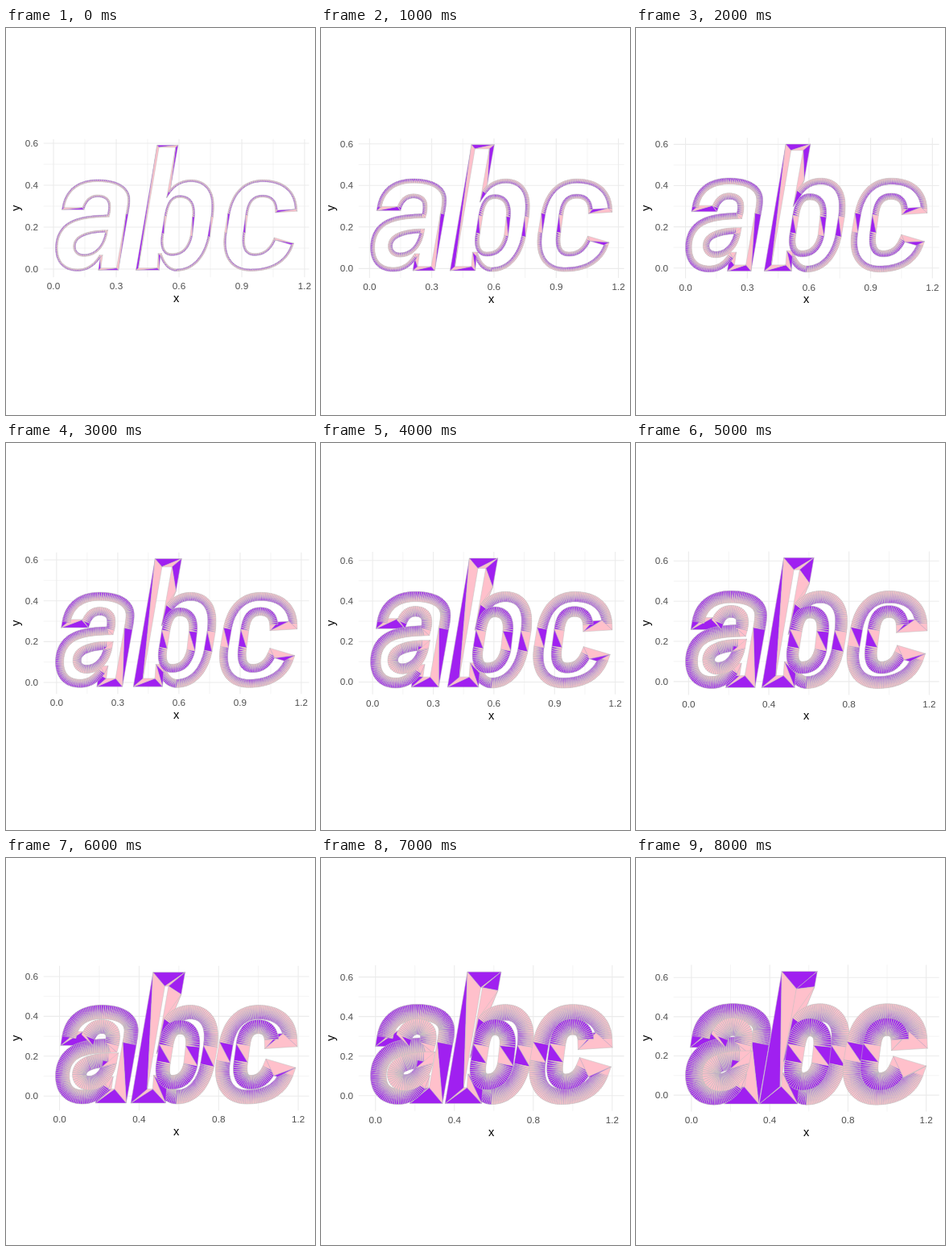
An HTML page with a canvas for the animation above (9 s loop, 384 px wide and 480 px high).

```html
<!DOCTYPE html>
<html lang="en">
<head>
<meta charset="utf-8">
<title>Stroked letters</title>
<style>
  html, body { margin: 0; width: 100%; height: 100%; overflow: hidden; background: #fff; }
  canvas { display: block; width: 384px; height: 480px; }
</style>
</head>
<body>
<canvas id="plot" width="384" height="480"></canvas>
<script>
const STEPS = 9, STEP_MS = 1000;
const PURPLE = '#a020f0', PINK = '#ffc0cb', EDGE = '#bebebe', GRID = '#ebebeb';
const FONT = '"Liberation Sans", Arial, sans-serif';
const UNIT = 260;                       // pixels per axis unit at the first step
const ORIGIN = { x: 59, y: 299 };
const CENTER = { x: 211.7, y: 223.4 };
const LEFT = 46.7, RIGHT = 376.7;
const ctx = document.getElementById('plot').getContext('2d');

// Letter outlines; F swaps the two fill colours from there on.
const CONTOURS = [
  `M96 224 L71 224 C74 202 89 189.3 114 189.3 C138 189.3 152.7 198 152.7 213
   C152.7 219 151.5 225 150.5 230.5 L138.5 299 L116.3 299 L118.6 283 L116.8 283
   C110 294 101 300.2 89 300.2 C72 300.2 62.8 290 62.8 273
   C62.8 255 72 243 88 238 C100 234 114 233.5 127 233
   C128.5 228 129 223 128.5 219 C128 212 122 208.3 114 208.3
   C105 208.3 99 214 96 224`,
  `M125 252 C112 252 103 254 97 256.5 C89 259.5 85 264.5 85 271
   C85 278 90 282 97 282 C111 282 122 271 125 252`,
  `M212 300.2 C203 300.2 196.5 293 192.3 281 L190.5 281 L189.2 299 L163 299
   L189 146.6 L212.3 146.6 L202 205 F C208.4 195.5 217.5 189.5 230 189.5
   C247 189.5 257 201 257 220 C257 225 256.8 229 256.2 234
   L252 259 C247 283 233 300.2 212 300.2`,
  `M216 209 C206 209 201 217 198.3 233 L194.8 255 C192 270 195 281 206 281
   C220 281 227 272 230.3 258 L233 234 C234.5 217 228 209 216 209`,
  `M356 268 C349 289 331 300.2 304 300.2 C284 300.2 272 288 272 266
   C272 262 272.4 258 273 254 L277 230 C282 204 297 189.5 319 189.5
   C344 189.5 360 202 360.5 226 L336 227.5 C336 215 330 208.5 319 208.5
   C306 208.5 301 217 299 232 L296 254 C293.5 271 297 281 309 281
   C321 281 329 274 334 261.5`
];

let swapped = false;

// Turns an outline into a closed list of points, each with its swap flag.
function flatten(path) {
  const pts = [];
  let last;
  const add = (x, y) => { last = { x, y, swapped }; pts.push(last); };
  for (const [, cmd, args] of path.matchAll(/([MLCF])([^MLCF]*)/g)) {
    const n = args.trim().split(/\s+/).map(Number);
    if (cmd === 'F') {
      swapped = !swapped;
      last.swapped = swapped;
    } else if (cmd === 'C') {
      const { x, y } = last;
      const [ax, ay, bx, by, ex, ey] = n;
      const length = (Math.hypot(ex - x, ey - y) + Math.hypot(ax - x, ay - y) +
        Math.hypot(bx - ax, by - ay) + Math.hypot(ex - bx, ey - by)) / 2;
      const count = Math.max(3, Math.round(length / 1.9));
      for (let i = 1; i <= count; i++) {
        const t = i / count, u = 1 - t;
        const mix = (a, b, c, d) => u*u*u*a + 3*u*u*t*b + 3*u*t*t*c + t*t*t*d;
        add(mix(x, ax, bx, ex), mix(y, ay, by, ey));
      }
    } else add(n[0], n[1]);
  }
  const end = pts[pts.length - 1];
  if (Math.hypot(end.x - pts[0].x, end.y - pts[0].y) < 0.01) pts.pop();
  return pts;
}

function normal(a, b) {
  const len = Math.hypot(b.x - a.x, b.y - a.y);
  return { x: (b.y - a.y) / len, y: (a.x - b.x) / len };
}

// Adds to every point its unit miter vector.
function withMiters(pts) {
  const n = pts.length;
  return pts.map((p, i) => {
    const a = normal(pts[(i + n - 1) % n], p), b = normal(p, pts[(i + 1) % n]);
    const k = 1 + a.x * b.x + a.y * b.y;
    return { ...p, mx: (a.x + b.x) / k, my: (a.y + b.y) / k };
  });
}

const shapes = CONTOURS.map(c => withMiters(flatten(c)));

function triangle(color, ...corners) {
  ctx.beginPath();
  for (const [x, y] of corners) ctx.lineTo(x, y);
  ctx.closePath();
  ctx.fillStyle = color;
  ctx.fill();
  ctx.stroke();
}

function drawLetters(scale, half) {
  const place = (p, d) => [
    CENTER.x + (p.x + p.mx * d - CENTER.x) * scale,
    CENTER.y + (p.y + p.my * d - CENTER.y) * scale
  ];
  ctx.strokeStyle = EDGE;
  ctx.lineWidth = 0.5;
  ctx.lineJoin = 'round';
  for (const pts of shapes) {
    pts.forEach((p, i) => {
      const q = pts[(i + 1) % pts.length];
      const outP = place(p, half), outQ = place(q, half);
      const inP = place(p, -half), inQ = place(q, -half);
      triangle(p.swapped ? PINK : PURPLE, outP, outQ, inP);
      triangle(p.swapped ? PURPLE : PINK, outQ, inQ, inP);
    });
  }
}

function line(x1, y1, x2, y2, width) {
  ctx.strokeStyle = GRID;
  ctx.lineWidth = width;
  ctx.beginPath();
  ctx.moveTo(x1, y1);
  ctx.lineTo(x2, y2);
  ctx.stroke();
}

function text(str, x, y, size, color, align) {
  ctx.font = `${size}px ${FONT}`;
  ctx.fillStyle = color;
  ctx.textAlign = align;
  ctx.fillText(str, x, y);
}

function drawAxes(step, scale) {
  const top = 137.65 - 0.65 * step, bottom = 309.25 + 0.65 * step;
  const px = v => CENTER.x + (ORIGIN.x + v * UNIT - CENTER.x) * scale;
  const py = v => CENTER.y + (ORIGIN.y - v * UNIT - CENTER.y) * scale;
  const gapX = step < 5 ? 0.3 : 0.4, countX = step < 5 ? 4 : 3;
  const gapY = 0.2, countY = 3;
  const vertical = (v, w) => line(px(v), top, px(v), bottom, w);
  const horizontal = (v, w) => line(LEFT, py(v), RIGHT, py(v), w);

  for (let i = 0; i < countY; i++) horizontal((i + 0.5) * gapY, 0.53);
  for (let i = 0; i < countX; i++) vertical((i + 0.5) * gapX, 0.53);
  for (let i = 0; i <= countY; i++) horizontal(i * gapY, 1.07);
  for (let i = 0; i <= countX; i++) vertical(i * gapX, 1.07);

  const labelY = Math.round(324.25 + 0.65 * step);
  for (let i = 0; i <= countX; i++) {
    text((i * gapX).toFixed(1), px(i * gapX), labelY, 11.73, '#4d4d4d', 'center');
  }
  for (let i = 0; i <= countY; i++) {
    text((i * gapY).toFixed(1), 40.1, Math.round(py(i * gapY) + 4), 11.73, '#4d4d4d', 'right');
  }
  text('x', CENTER.x, Math.round(340 + 0.65 * step), 14.67, '#000', 'center');
  ctx.save();
  ctx.translate(17, CENTER.y);
  ctx.rotate(-Math.PI / 2);
  text('y', 0, 0, 14.67, '#000', 'center');
  ctx.restore();
}

function draw(step) {
  const scale = 1.154 / (1.154 + 0.01 * step);
  ctx.fillStyle = '#fff';
  ctx.fillRect(0, 0, 384, 480);
  drawAxes(step, scale);
  drawLetters(scale, 0.005 * UNIT * (step + 1));
}

const start = performance.now();
let shown = 0;
draw(0);

function tick() {
  const step = Math.floor((performance.now() - start) / STEP_MS) % STEPS;
  if (step !== shown) draw(shown = step);
  requestAnimationFrame(tick);
}
requestAnimationFrame(tick);
</script>
</body>
</html>
```
